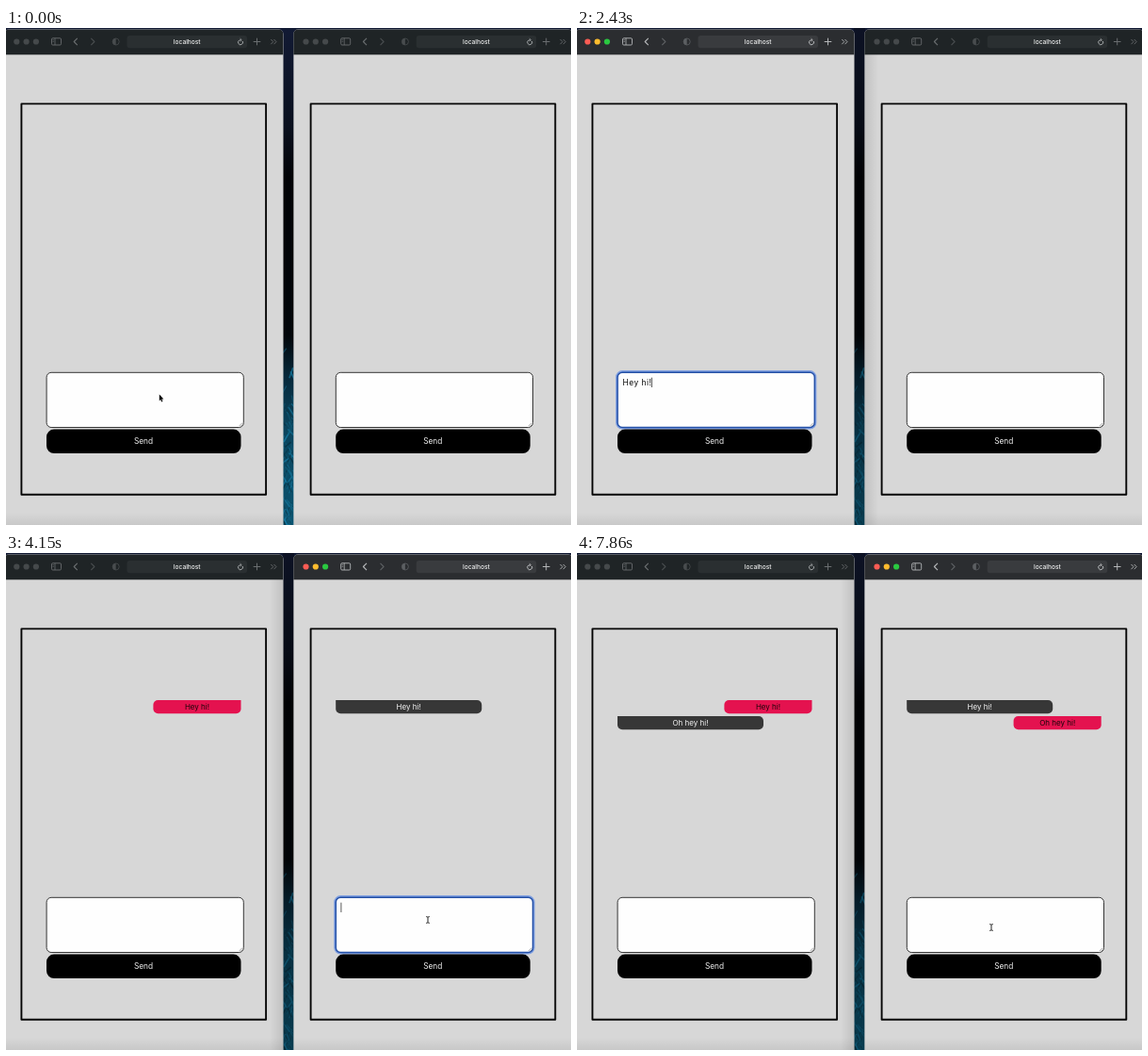
These frames come from a looping animation (600x527 px, 8 s). An HTML page with a canvas:

```html
<!DOCTYPE html>
<html lang="en">
<head>
<meta charset="utf-8">
<title>Two chat windows</title>
<style>
html, body { margin: 0; width: 600px; height: 527px; overflow: hidden; background: #05070d; }
canvas { display: block; width: 600px; height: 527px; }
</style>
</head>
<body>
<canvas id="stage"></canvas>
<script>
const W = 600, H = 527, LOOP = 8000, FPS = 7;
const canvas = document.getElementById('stage');
const ctx = canvas.getContext('2d');
const dpr = window.devicePixelRatio || 1;
canvas.width = W * dpr;
canvas.height = H * dpr;

// All times below are in ticks of 1/7 second.
const LEFT = {
  x: 0, active: t => t >= 3 && t < 28, focus: [4, 21],
  text: 'Hey hi!', keys: [10, 11, 12, 13, 14, 15, 16],
  caret: t => t >= 10 || t % 4 < 2
};
const RIGHT = {
  x: 307.2, active: t => t >= 28, focus: [28, 50],
  text: 'Oh hey hi!', keys: [32, 33, 34, 35, 36, 37, 38, 41, 42, 43],
  caret: () => true
};
const MESSAGES = [
  { from: LEFT, at: 21, y: 156 },
  { from: RIGHT, at: 50, y: 173 }
];
// Pointer path: tick, x, y, shape from that tick on.
const POINTER = [
  [0, 163, 392, 'arrow'], [2, 163, 392, 'arrow'], [3, 161, 389, 'beam'],
  [9, 161, 389, 'none'], [17, 161, 389, 'none'], [18, 163, 398, 'beam'],
  [20, 178, 437, 'arrow'], [22, 178, 437, 'arrow'], [24, 205, 428, 'arrow'],
  [27, 425, 396, 'arrow'], [28, 448, 389, 'beam'], [32, 448, 389, 'none'],
  [44, 448, 389, 'none'], [45, 448, 392, 'beam'], [48, 455, 438, 'arrow'],
  [52, 455, 440, 'arrow'], [54, 441, 403, 'beam'], [55, 440, 397, 'beam']
];

function box(x, y, w, h, r, fill) {
  ctx.beginPath();
  ctx.roundRect(x, y, w, h, r);
  if (fill) { ctx.fillStyle = fill; ctx.fill(); }
}

function stroke(color, width) {
  ctx.strokeStyle = color;
  ctx.lineWidth = width;
  ctx.stroke();
}

function poly(points, color, width) {
  ctx.beginPath();
  points.forEach(([x, y]) => ctx.lineTo(x, y));
  stroke(color, width);
}

function disc(x, y, r, color) {
  ctx.beginPath();
  ctx.arc(x, y, r, 0, 7);
  ctx.fillStyle = color;
  ctx.fill();
}

function gradient(x0, y0, x1, y1, stops) {
  const g = ctx.createLinearGradient(x0, y0, x1, y1);
  stops.forEach(([at, color]) => g.addColorStop(at, color));
  return g;
}

function label(str, x, y, size, color, align = 'center', spacing = 0, weight = 400) {
  ctx.font = `${weight} ${size}px Inter, "Liberation Sans", sans-serif`;
  ctx.letterSpacing = spacing + 'px';
  ctx.textAlign = align;
  ctx.fillStyle = color;
  ctx.fillText(str, x, y);
  const width = ctx.measureText(str).width;
  ctx.letterSpacing = '0px';
  return width;
}

function drawDesktop(dimmed) {
  ctx.fillStyle = gradient(0, 0, 0, H, [
    [0, '#121a34'], [0.2, '#0a101e'], [0.3, '#020306'], [0.62, '#02060a'],
    [0.7, '#06283a'], [0.8, '#0a435c'], [1, '#0b5470']
  ]);
  ctx.fillRect(0, 0, W, H);

  let seed = 11;
  const rnd = () => (seed = (seed * 16807) % 2147483647) / 2147483647;
  for (let i = 0; i < 110; i++) {
    const y = 338 + 192 * Math.sqrt(rnd()), x = 292 + 13 * rnd();
    const dx = 3 + 4 * rnd(), dy = 5 + 8 * rnd(), side = rnd() < 0.65 ? 1 : -1;
    const tone = 12 + 26 * rnd();
    poly([[x, y], [x + side * dx, y + dy]], `hsla(197, 78%, ${tone}%, .75)`, 0.8 + rnd());
  }
  if (dimmed) {
    ctx.fillStyle = 'rgba(0,0,0,.3)';
    ctx.fillRect(294, 0, 12, H);
  }
}

function drawToolbar(on) {
  const icon = on ? '#b4b6b8' : '#696d6f';
  const faint = on ? '#5c5f62' : '#484c4e';
  const bright = on ? '#c8cacc' : '#b4b7b8';
  ctx.fillStyle = on ? '#2b2d30' : '#1f2426';
  ctx.fillRect(-2, 1.5, 296.5, 26.8);
  ctx.fillStyle = on ? '#55585c' : '#3d4247';
  ctx.fillRect(-2, 1.5, 296.5, 0.6);

  const lights = on ? ['#fb5c54', '#fdbc2e', '#2ac840'] : Array(3).fill('#45494b');
  lights.forEach((c, i) => disc(11.3 + i * 10.3, 14.5, 3.1, c));

  box(48.5, 10.8, 10, 7.2, 1.2);
  stroke(icon, 0.9);
  poly([[52, 10.8], [52, 18]], icon, 0.8);
  poly([[49.5, 12.7], [51, 12.7]], icon, 0.6);
  poly([[49.5, 14.4], [51, 14.4]], icon, 0.6);
  poly([[75.8, 10.8], [72.2, 14.5], [75.8, 18.2]], icon, 1.1);
  poly([[90.3, 10.8], [93.9, 14.5], [90.3, 18.2]], faint, 1.1);

  ctx.beginPath();
  ctx.arc(116.7, 14.5, 3.5, 0, 7);
  stroke(faint, 0.8);
  ctx.beginPath();
  ctx.arc(116.7, 14.5, 3.5, Math.PI / 2, Math.PI * 1.5);
  ctx.fillStyle = faint;
  ctx.fill();

  box(128.5, 8, 127.5, 13.2, 3, on ? '#393b3e' : '#2a2f31');
  label('localhost', 192.2, 17.3, 6.6, '#f0f1f1', 'center', 0, 500);
  ctx.beginPath();
  ctx.arc(249, 15.2, 2.5, -0.5, Math.PI * 1.55);
  stroke(bright, 0.9);
  poly([[248.6, 11.2], [250.2, 12.7], [248.6, 14]], bright, 0.8);

  poly([[262.7, 14.5], [270.3, 14.5]], icon, 1);
  poly([[266.5, 10.7], [266.5, 18.3]], icon, 1);
  for (const x of [281.3, 284.5]) {
    poly([[x, 12], [x + 2.5, 14.6], [x, 17.2]], icon, 0.9);
  }
}

function drawField(win, t) {
  const focused = t >= win.focus[0] && t < win.focus[1];
  if (focused) {
    box(42.6, 364.7, 210.2, 59.2, 5.5);
    stroke('#7f9fe0', 3.2);
  }
  box(43.1, 365.3, 209.2, 58.2, 5, '#fefefe');
  stroke(focused ? '#2450a6' : '#2c2c2c', focused ? 1.5 : 0.95);
  poly([[247.6, 422], [251, 418.6]], '#777', 0.6);
  poly([[249.6, 422], [251, 420.6]], '#777', 0.6);
  if (!focused) return;

  const typed = win.text.slice(0, win.keys.filter(k => k <= t).length);
  const width = label(typed, 48.6, 379.1, 8.5, '#0c0c0c', 'left', 0.42);
  if (win.caret(t)) {
    const x = 48.7 + width;
    poly([[x, 370.7], [x, 381]], '#444', 0.9);
  }
}

function drawWindow(win, t) {
  const on = win.active(t);
  ctx.save();
  ctx.translate(win.x, 0);
  box(-2, 1.5, 296.5, H + 10, 5);
  ctx.clip();
  ctx.fillStyle = '#d7d7d7';
  ctx.fillRect(-2, 0, 297, H);
  ctx.fillStyle = gradient(0, 514, 0, H, [[0, 'rgba(0,0,0,0)'], [1, 'rgba(0,0,0,.07)']]);
  ctx.fillRect(-2, 514, 297, 13);
  drawToolbar(on);

  ctx.strokeStyle = '#050505';
  ctx.lineWidth = 1.9;
  ctx.strokeRect(16.4, 80.4, 259.7, 414.3);

  for (const m of MESSAGES) {
    if (t < m.at) continue;
    const own = m.from === win;
    if (own) box(156.4, m.y, 93.1, 14.3, [5, 0, 5, 5], '#e4124f');
    else box(43, m.y, 155, 14.3, [0, 5, 5, 5], '#373737');
    label(m.from.text, own ? 203 : 120.5, m.y + 10.2, 8, own ? '#1a0509' : '#f4f4f4');
  }

  drawField(win, t);
  box(43, 425.6, 206.5, 25.5, 8, '#000');
  label('Send', 146, 441, 8.3, '#f2f2f2');

  // Soft shadow cast by the window in front.
  const other = win === LEFT ? RIGHT : LEFT;
  if (other.active(t)) {
    const [from, to] = win === LEFT ? [294.5, 280] : [-2, 13];
    ctx.fillStyle = gradient(from, 0, to, 0, [[0, 'rgba(0,0,0,.1)'], [1, 'rgba(0,0,0,0)']]);
    ctx.fillRect(-2, 28, 297, H);
  }
  ctx.restore();
}

function drawPointer(t) {
  const i = POINTER.findLastIndex(p => p[0] <= t);
  const a = POINTER[i], b = POINTER[i + 1] || a;
  const f = b === a ? 0 : (t - a[0]) / (b[0] - a[0]);
  const e = f * f * (3 - 2 * f);
  const x = a[1] + (b[1] - a[1]) * e, y = a[2] + (b[2] - a[2]) * e;
  if (a[3] === 'none') return;

  ctx.save();
  ctx.translate(x, y);
  if (a[3] === 'beam') {
    poly([[0, -3], [0, 3]], '#222', 1);
    for (const s of [-1, 1]) {
      poly([[-1.9, s * 3.4], [-0.6, s * 3.2], [0, s * 2.7], [0.6, s * 3.2], [1.9, s * 3.4]], '#222', 0.9);
    }
  } else {
    ctx.beginPath();
    [[0, -3.5], [0, 3.3], [1.5, 2], [2.5, 4.6], [3.6, 4.1], [2.6, 1.6], [4.6, 1.5]]
      .forEach(([px, py]) => ctx.lineTo(px - 0.2, py));
    ctx.closePath();
    stroke('#fff', 1.3);
    ctx.fillStyle = '#000';
    ctx.fill();
  }
  ctx.restore();
}

function draw(ms) {
  const t = Math.floor(((ms % LOOP) + 4) * FPS / 1000) % 56;
  ctx.setTransform(dpr, 0, 0, dpr, 0, 0);
  ctx.lineJoin = 'round';
  drawDesktop(t >= 3);
  drawWindow(LEFT, t);
  drawWindow(RIGHT, t);
  drawPointer(t);
}

const start = performance.now();
function loop() {
  draw(performance.now() - start);
  requestAnimationFrame(loop);
}
loop();
</script>
</body>
</html>
```
